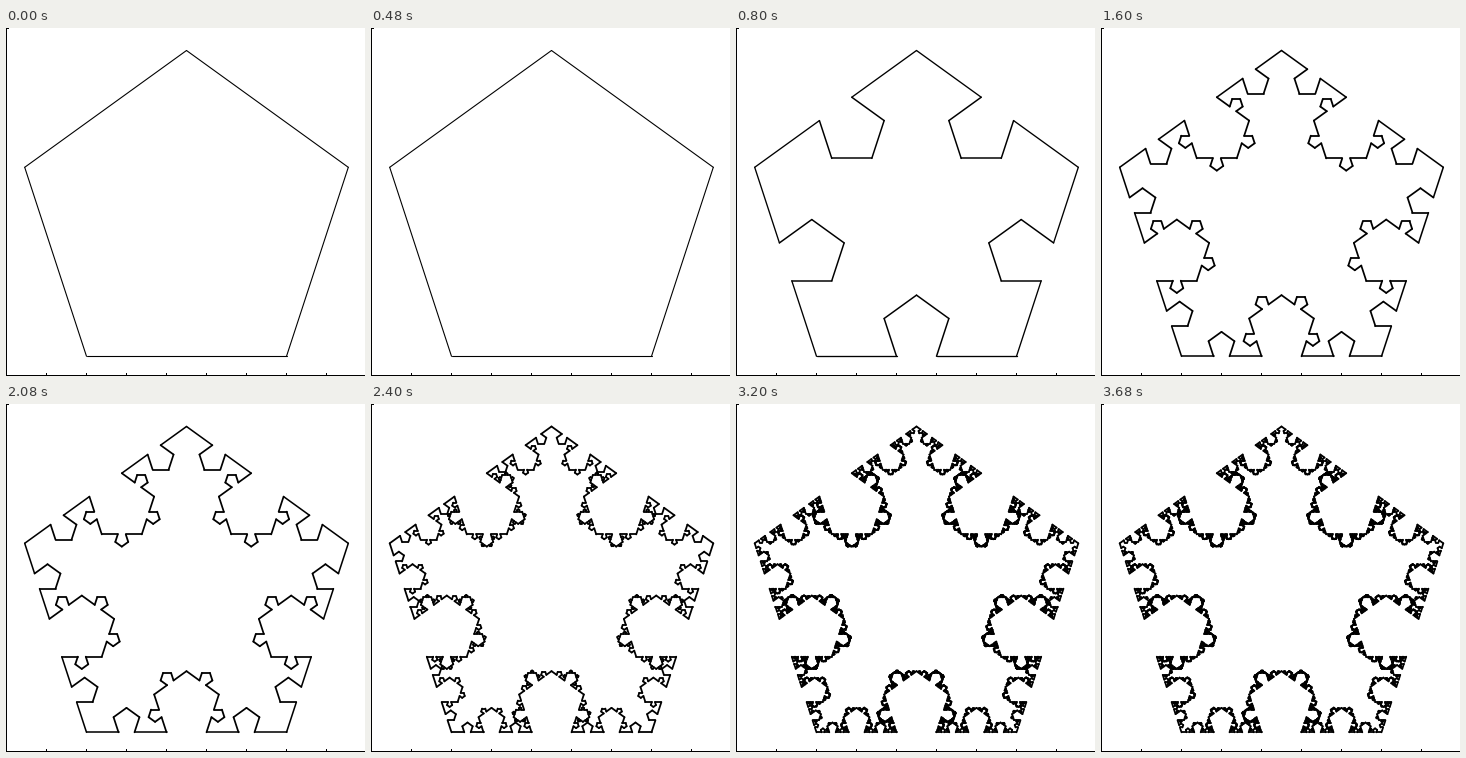
Animation, 359 px wide and 348 px high, one loop 4000 ms. Source, as a matplotlib script:

```python
import numpy as np
import matplotlib.pyplot as plt
from matplotlib.animation import FuncAnimation
from matplotlib.collections import LineCollection
from matplotlib.patches import Rectangle

W, H, DPI = 359, 348, 64
LEVELS = 5
SIDE = 200
BASE_Y, APEX_Y = 327.8, 22
Y_SCALE = (BASE_Y - APEX_Y) / (SIDE * 1.53884)


def turn(degrees):
    return np.exp(1j * np.radians(degrees))


# One edge becomes two long pieces around an open pentagon on its left.
STEPS = np.array([0.4] + [0.2 * turn(a) for a in (108, 36, -36, -108)] + [0.4])


def refine(points):
    edges = np.diff(points)
    pieces = (edges[:, None] * STEPS).ravel()
    return np.concatenate([points[:1], points[0] + np.cumsum(pieces)])


def to_segments(points):
    xy = np.column_stack([points.real, BASE_Y - Y_SCALE * points.imag])
    lengths = np.abs(np.diff(points))
    # Shorter edges carry slightly heavier strokes.
    widths = np.minimum(1.8, 1.1 + 0.25 * np.log(SIDE / lengths))
    return np.stack([xy[:-1], xy[1:]], axis=1), widths * 72 / DPI


pentagon = 80 + np.concatenate(
    [[0], np.cumsum([SIDE * turn(72 * k) for k in range(5)])])
curves = [pentagon]
for _ in range(LEVELS - 1):
    curves.append(refine(curves[-1]))
stages = [to_segments(c) for c in curves]

fig = plt.figure(figsize=(W / DPI, H / DPI), dpi=DPI, facecolor="white")
ax = fig.add_axes([0, 0, 1, 1])
ax.set_xlim(-0.5, W - 0.5)
ax.set_ylim(H - 0.5, -0.5)
ax.axis("off")


def bar(x, y, w, h):
    ax.add_patch(Rectangle((x - 0.5, y - 0.5), w, h, fc="black", lw=0,
                           antialiased=False))


bar(0, 0, 1, H)
bar(0, H - 1, W, 1)
bar(0, 0, 3, 1)
for x in range(40, 321, 40):
    bar(x, H - 3, 1, 3)

outline = LineCollection([], colors="black", capstyle="round")
ax.add_collection(outline, autolim=False)


def draw(frame):
    segments, widths = stages[frame]
    outline.set_segments(segments)
    outline.set_linewidths(widths)
    return [outline]


anim = FuncAnimation(fig, draw, frames=LEVELS, interval=800, repeat=True,
                     repeat_delay=0, blit=False)
plt.show()
```
